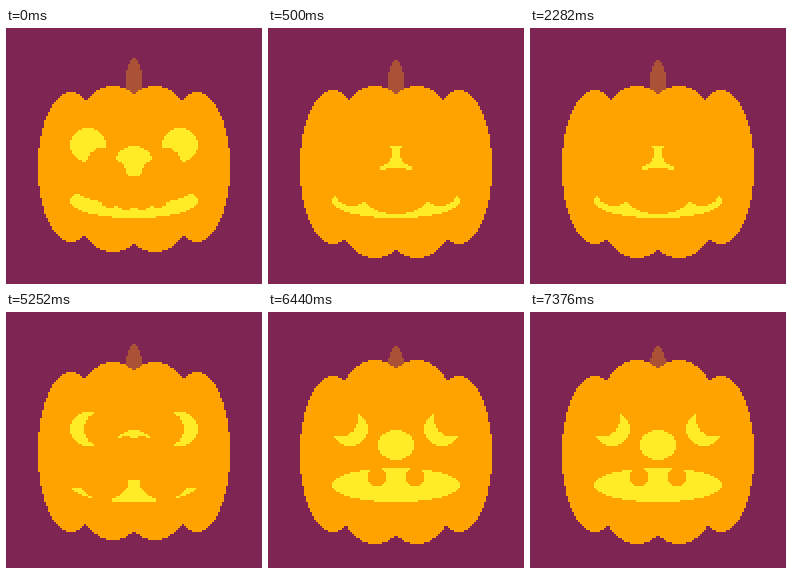
Animation, 256 px wide and 256 px high, one loop 8000 ms. Source, as an HTML page with a canvas:

```html
<!DOCTYPE html>
<html lang="en">
<head>
<meta charset="utf-8">
<title>Pumpkin faces</title>
<style>
  html, body { margin: 0; width: 100%; height: 100%; overflow: hidden; background: #7e2553; }
  canvas { display: block; width: 100vw; height: 100vh; image-rendering: pixelated; }
</style>
</head>
<body>
<canvas id="stage" width="256" height="256"></canvas>
<script>
const ctx = document.getElementById('stage').getContext('2d');
const PURPLE = '#7e2553', ORANGE = '#ffa300', YELLOW = '#ffec27', BROWN = '#ab5236';
const LOOP = 8000, CELL = 2;

// Ellipses are [cx, cy, rx, ry]; nostrils and teeth are mirrored about x = 128.
const poses = [
  { start: 0, side: [64, 214], middle: [58, 224], stem: 30, pupil: [16, 20],
    nostril: [108, 144, 12, 12],
    teeth: [[128, 162, 58, 14], [104, 170, 10, 10], [120, 172, 10, 10]] },
  { start: 500, side: [62, 216], middle: [58, 230], stem: 32, pupil: [0, 0],
    nostril: [112, 125, 12, 13],
    teeth: [[128, 163, 36, 23], [84, 162, 18, 16]] },
  { start: 3470, side: [60, 220], middle: [50, 228], stem: 32, pupil: [14, 0],
    nostril: [120, 136, 12, 12],
    teeth: [[98, 167, 25, 21], [128, 150, 30, 18], [68, 164, 14, 13]] },
  { start: 6440, side: [64, 220], middle: [48, 232], stem: 34, pupil: [-10, -10],
    teeth: [[109, 165, 9, 9]] }
];

const snap = v => Math.round(v / CELL) * CELL;

function oval(color, cx, cy, rx, ry) {
  ctx.fillStyle = color;
  for (let y = snap(cy - ry); y < cy + ry; y += CELL) {
    const d = (y + CELL / 2 - cy) / ry;
    if (Math.abs(d) >= 1) continue;
    const half = rx * Math.sqrt(1 - d * d);
    const left = snap(cx - half);
    ctx.fillRect(left, y, snap(cx + half) - left, CELL);
  }
}

function pair(color, cx, cy, rx, ry) {
  oval(color, cx, cy, rx, ry);
  oval(color, 256 - cx, cy, rx, ry);
}

function lobes(cx, rx, [top, bottom]) {
  pair(ORANGE, cx, (top + bottom) / 2, rx, (bottom - top) / 2);
}

function draw(pose) {
  ctx.fillStyle = PURPLE;
  ctx.fillRect(0, 0, 256, 256);

  oval(BROWN, 128, pose.stem + 24, 8, 24);
  lobes(65, 33, pose.side);
  lobes(107, 48, pose.middle);

  const [dx, dy] = pose.pupil;
  pair(YELLOW, 82, 117, 18, 17);
  pair(ORANGE, 82 + dx, 117 + dy, 18, 17.5);

  oval(YELLOW, 128, 133, 18, 15);
  if (pose.nostril) pair(ORANGE, ...pose.nostril);

  oval(YELLOW, 128, 173, 64, 17);
  for (const tooth of pose.teeth) pair(ORANGE, ...tooth);
}

let shown;
function tick() {
  const t = performance.now() % LOOP;
  const pose = poses.findLast(p => t >= p.start);
  if (pose !== shown) draw(shown = pose);
  requestAnimationFrame(tick);
}
tick();
</script>
</body>
</html>
```
